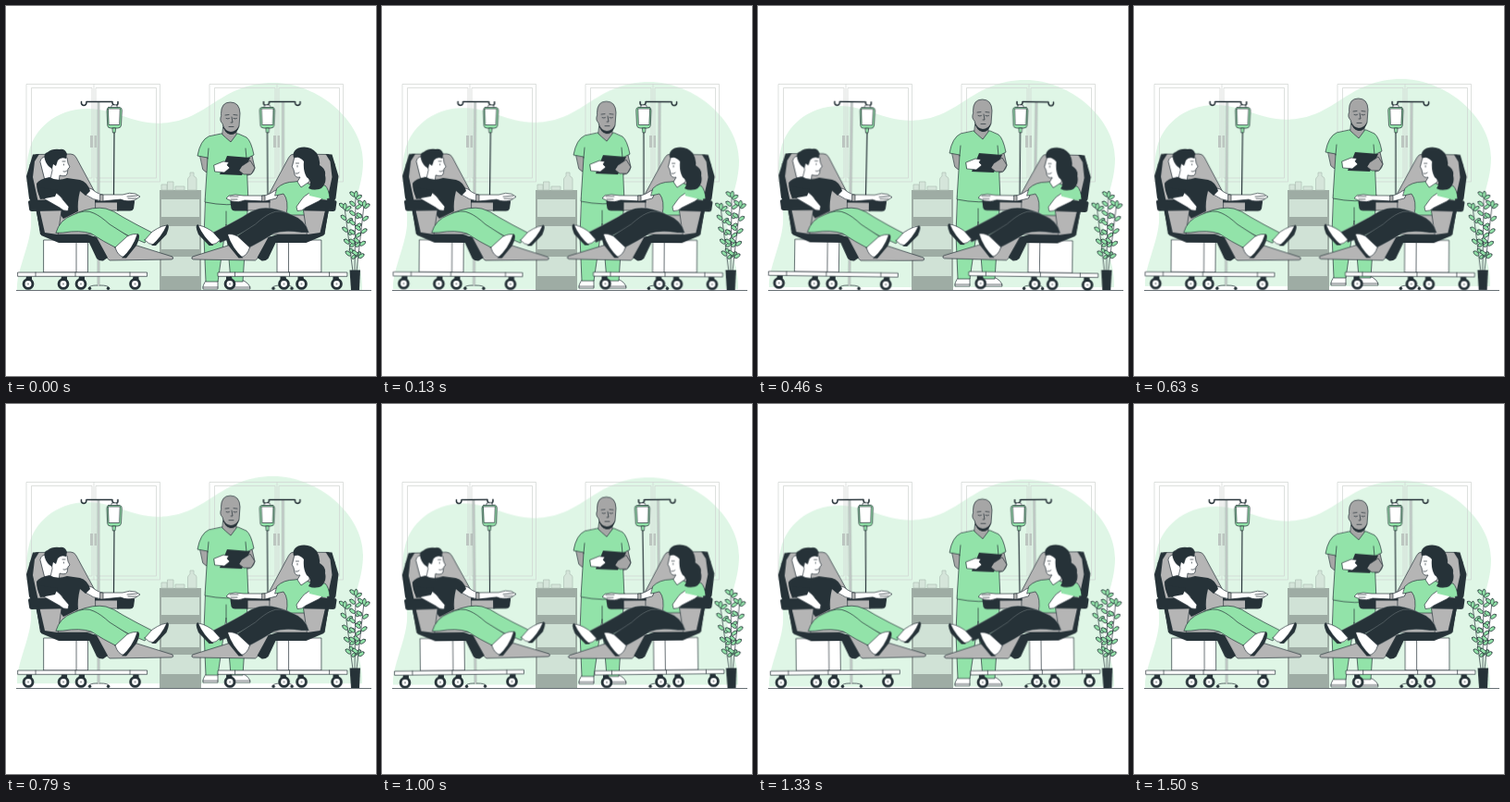
Recreate the animation shown at these times as an HTML page. Size 400x400 px, loop 1540 ms.

```html
<!DOCTYPE html>
<html lang="en">
<head>
<meta charset="utf-8">
<title>Infusion room</title>
<style>
  html, body { margin: 0; width: 100%; height: 100%; overflow: hidden; background: #fff; }
  svg { display: block; width: 100vw; height: 100vh; }
  .ink { fill: #263238; }
  .green { fill: #92e3a9; }
  .grey { fill: #b5b5b5; }
  .skin { fill: #a6a6a6; }
  .white { fill: #fff; }
  .ol { stroke: #263238; stroke-width: .7; stroke-linejoin: round; stroke-linecap: round; }
  .line { fill: none; stroke: #263238; stroke-width: .7; stroke-linecap: round; stroke-linejoin: round; }
  .frame { fill: none; stroke: #cfd3d0; stroke-width: .7; }
  .seam { stroke: #8b9599; stroke-width: .4; }
</style>
</head>
<body>
<svg viewBox="0 0 400 400">
  <defs>
    <g id="window">
      <path class="frame" d="M22 84.5H166.500V190H22ZM27.500 88.500H93V186H27.500ZM97 88.500H162.500V186H97ZM95 84.500V190"/>
      <path fill="#bcc5c0" d="M91 140H94V153H91ZM95.500 140H98V153H95.500Z"/>
    </g>

    <g id="stand">
      <path class="line" d="M90 304Q91 302 98 302H102Q110 302 111 304"/>
      <circle class="ink" cx="90.500" cy="305.300" r="1.700"/>
      <circle class="ink" cx="110.500" cy="305.300" r="1.700"/>
      <path d="M100 103V303" stroke="#66706f" stroke-width="2.400"/>
      <path d="M100 103V303" stroke="#edf5f0" stroke-width="1.300"/>
      <path class="line" style="stroke-width:1.500" d="M81.500 103.500Q81 107 84 107.500Q87 107.500 87 103.500H115V105Q116 108 119 107.500Q121.500 107 121 103.500"/>
      <path class="white ol" d="M113 111L114.500 107H119.500L121 111Z"/>
      <path class="green ol" d="M111 109.500H123Q125.500 110 125.300 113L124.500 129Q124 132 121 132H113Q110 132 109.700 129L109 113Q109 110 111 109.500Z"/>
      <path class="white ol" d="M110.800 111H123.300L122.600 128.500H111.400Z"/>
      <path class="green ol" d="M115.300 132H118.700L118 137H115.800Z"/>
      <path class="line" style="stroke-width:1.200" d="M117 137L116.500 204"/>
    </g>

    <g id="wheel">
      <path class="ink" d="M-2 -8H4V-3H-3Z"/>
      <circle r="4.900" fill="#fff" stroke="#263238" stroke-width="2.900"/>
      <circle r="1" fill="#8b9194"/>
    </g>

    <g id="chairBack">
      <path class="white ol" d="M41 253H88.500V288H41ZM76 253V288"/>
      <rect class="white ol" x="13" y="288" width="139.500" height="4.300"/>
      <path class="line" d="M32 288V292M75 288V292M134 288V292"/>
      <use href="#wheel" x="24" y="300.500"/><use href="#wheel" x="62" y="300.500"/>
      <use href="#wheel" x="81" y="300.500"/><use href="#wheel" x="139.500" y="300.500"/>
      <path class="grey ol" d="M100 246L180 271Q182 273.500 179 274L112 275L90 255Z"/>
      <path class="grey ol" d="M33 160.500L70 160Q74 160 76 164L97 203L101 247H38L26 172Z"/>
      <path class="ink" d="M29 160.500L36 160L31 168L29 185L37 222L43 247H37L33 222L25 208L22 184Z"/>
      <path class="grey ol" d="M97 211H122V221H97Z"/>
      <path class="ink" d="M96 209H137Q139 209 139 212L138 219Q137 221.500 134 221.500H120V212.500H96Z"/>
    </g>
    <g id="chairFront">
      <path class="grey ol" d="M36 221H60L56 248H41Z"/>
      <path class="ink" d="M32.500 221L38 248L57 256H90L98 273Q101 276 105 275.500L110 272L98 250L88 247H56L42 245L36.500 221Z"/>
      <path class="ink" d="M24 212Q24 210 27 210L60 209Q63 210 63 213L62 219Q61 221 58 221L28 222Q25 222 25 219Z"/>
    </g>
    <path id="farLeg" d="M76 224Q95 216 108 219Q116 221 126 228Q142 237 158 245L150 256Q134 250 118 241L78 238Z"/>
    <path id="nearLeg" d="M54 245Q58 231 72 226Q86 219 95 224Q102 227 112 236L134 250L122 263Q104 254 92 246Q80 242 62 245Z"/>
    <g id="shoes">
      <path class="white ol" d="M150 253L158 244Q170 236 175 237.500Q172 249 160 258Q154 258 150 253Z"/>
      <path class="ink" d="M174 236Q178 236.500 173.500 247L162 259H157Q168 250 174 236Z"/>
      <path class="white ol" d="M118 261L131 249Q138 245.500 142.500 247Q141 260 128 271.500Q121 271 118 261Z"/>
      <path class="ink" d="M142 246Q146.500 247 141 259L130 272.500H125Q137 262 142 246Z"/>
    </g>
  </defs>

  <path id="blob" fill="#dff6e6" d="M12 307C11 287 25 262 27 238C29 210 17 187 25 157C30 135 52 111 89 111C117 111 139 129 170 126.500C218 124 232 83 289 83C337 83 386 124 386 168C386 198 371 218 374 247C376 270 386 281 385 307Z"/>

  <use href="#window"/>
  <use href="#window" x="198"/>

  <g id="trolley">
    <path fill="#9eaca4" d="M166 199H211V307H166Z"/>
    <path fill="#d0e2d6" d="M168 209H209V228H168ZM168 238H209V263H168ZM168 271H209V292H168Z"/>
    <path fill="#d5e5da" stroke="#b1c0b7" stroke-width=".7" d="M168 193H174V199H168ZM174.500 190H181V199H174.500ZM196.500 187Q197 185 199 184V180H203V184Q206 185 206 187V199H196.500ZM183 195H193V199H183Z"/>
  </g>

  <path d="M11 307.500H395" stroke="#263238" stroke-width=".7"/>

  <g id="nurse">
    <path class="white ol" d="M217 296L229 297V306H213Q212 302 217 296ZM243 296H255Q264 300 264 306H242Z"/>
    <path class="line" d="M213 304H229M242 304H264"/>
    <path class="green ol" d="M216 208H262L259 252L256 298H243L238 236L229 298H216L214 250Z"/>
    <path class="line" d="M238 236V222"/>
    <path class="skin ol" d="M210 162H222L223 169L233 174L232 180Q218 183 213 177ZM257 162H266L269 175Q267 184 258 183L252 177Z"/>
    <path class="green ol" d="M233 138L251 138L260 142Q265 146 268 161L260 165L262 213Q239 217 215 212L218 164L207 162Q210 145 219 141Z"/>
    <path class="line" d="M219 154L218 165M259 154L260 165"/>
    <path class="skin ol" d="M235 131H249V139L243 147Q237 142 234 139Z"/>
    <path class="skin ol" d="M232.500 116Q232.500 104 242.500 104Q252.500 104 253 116L252 130Q249 138.500 243 138.500Q236 137 234 127Q230.500 124 232.500 119Z"/>
    <path class="ink" d="M234 128Q237 135.500 243 136Q249 136 252 129Q250 139 243 139Q236 138 234 128Z"/>
    <path class="line" d="M237 118L241 117.500M246 117.500L250 118M238 121.500Q240 122.500 241.500 121.500M246 121.500Q248 122.500 249.500 121.500M244 120L245 126H243M241 130.500H246"/>
    <path class="ink" d="M239 162L264 164L255 183L231 182Z"/>
    <path class="white ol" d="M225 172L235 168L241 169L239 172L242 175L236 180L226 179Z"/>
    <path class="skin ol" d="M255 173L264 167L269 175L265 182L257 182L252 178Z"/>
  </g>

  <g id="left">
    <use href="#stand"/>
    <use href="#chairBack"/>
    <path class="white ol" d="M37 168Q38 163 43 163L52 170L50 187H42Z"/>
    <path class="white ol" d="M86 196L93 198Q101 205 108 204H126Q134 201 140 203L145 206L139 210Q130 212 124 209L104 211Q94 210 86 204Z"/>
    <path class="grey ol" d="M102 204H105V211H102Z"/>
    <path class="line" d="M131 206L142 205M132 208L141 208"/>
    <path class="white ol" d="M48 168Q50 160 58 161L66 164L67 170L69 174L67 176L66 182Q64 185 58 183L57 191H47L50 178Z"/>
    <path class="ink" d="M42 166Q40 159 45 158Q50 154 58 155Q64 154 66 160L65 165Q59 163 56 167L54 173L51 171L50 176Q44 173 42 166Z"/>
    <path class="line" d="M61 168H64M62.500 171V172M62 179Q64 180 66 178"/>
    <path class="ink" d="M33 192Q36 187 47 185Q55 190 66 186L80 188Q88 190 91 200L86 205L80 200Q77 212 78 222L62 230L56 222L52 210L37 208Q33 200 33 192Z"/>
    <use href="#farLeg" class="green ol"/>
    <use href="#chairFront"/>
    <use href="#nearLeg" class="green ol"/>
    <use href="#shoes"/>
    <path class="white ol" d="M38 206L53 201Q60 206 62 210L68 217L67 221.500Q62 222 58 218L44 210Z"/>
    <path class="ink" d="M34 196L56 199L53 206L37 209Z"/>
  </g>

  <g id="right">
    <use href="#stand" transform="matrix(-1 0 0 1 399.500 0)"/>
    <use href="#chairBack" transform="matrix(-1 0 0 1 381.500 0)"/>
    <path class="white ol" d="M297 197L290 200Q282 206 274 205H257Q247 203 241 205L238 208L244 211Q252 213 258 210L280 211L292 208Z"/>
    <path class="grey ol" d="M277 205H280V211H277Z"/>
    <path class="line" d="M242 206L251 206M243 209H250"/>
    <path class="green ol" d="M293 197Q300 190 312 190L318 189L330 193L345 194Q349 198 350 208L338 210L335 226H303Q306 210 300 203L291 205Z"/>
    <path class="white ol" d="M312 164L322 160L328 176V190L319 196L315 190L318 185Q313 186 312 182L311 177L309.500 174Z"/>
    <path class="line" d="M313.500 170H316.500M315 172.500V174M313 181Q315 182 317 180"/>
    <path class="ink" d="M311 164Q309 157 316 153.500Q328 150 336 159Q340 166 339 172Q346 176 345 183Q347 191 341 197Q334 201 327 197Q332 190 325 185Q321 178 322 168Q317 162 311 164Z"/>
    <g transform="matrix(-1 0 0 1 381.500 0)">
      <use href="#farLeg" class="ink seam"/>
      <use href="#chairFront"/>
      <use href="#nearLeg" class="ink seam"/>
      <use href="#shoes"/>
    </g>
    <path class="white ol" d="M343 207L328 202Q321 206 319 210L314 217L315 221.500Q320 222 324 218L338 211Z"/>
    <path class="green" d="M346 198L327 199L328 205L347 209.500Z"/>
  </g>

  <g id="plant">
    <g id="leaves"></g>
    <path class="ink" d="M371.500 285.500H383L382 307H373Z"/>
  </g>
</svg>

<script>
  const LOOP = 1540;
  const $ = id => document.getElementById(id);

  const stems = [[375, 366, 218, 5], [377, 378, 205, 7], [379, 387, 215, 5]];
  const leaf = (x, y, angle) =>
    `<ellipse class="green ol" cx="4.200" rx="3.500" ry="1.900" transform="translate(${x} ${y}) rotate(${angle})"/>`;

  $('leaves').innerHTML = stems.map(([x0, x1, top, count]) => {
    const stem = `<path class="line" d="M${x0} 287L${x1} ${top}"/>`;
    const pairs = Array.from({ length: count }, (_, i) => {
      const k = .2 + .75 * i / (count - 1);
      const x = x0 + (x1 - x0) * k, y = 287 + (top - 287) * k;
      return leaf(x, y, -35) + leaf(x, y - 3, -140);
    });
    return stem + pairs.join('') + leaf(x1, top + 3, -85);
  }).join('');

  function loop(id, frames) {
    $(id).animate(frames, { duration: LOOP, iterations: Infinity }).startTime = 0;
  }

  function float(id) {
    loop(id, [0, -5, 0].map(y => ({ transform: `translateY(${y}px)` })));
  }

  function sway(id, origin) {
    $(id).style.transformOrigin = origin;
    loop(id, [[0, 0], [.25, 1], [.75, -1], [1, 0]].map(([offset, deg]) =>
      ({ offset, transform: `rotate(${deg}deg)` })));
  }

  float('blob');
  float('nurse');
  sway('left', '97px 205px');
  sway('right', '284.5px 205px');
  sway('plant', '377px 254px');
</script>
</body>
</html>
```
